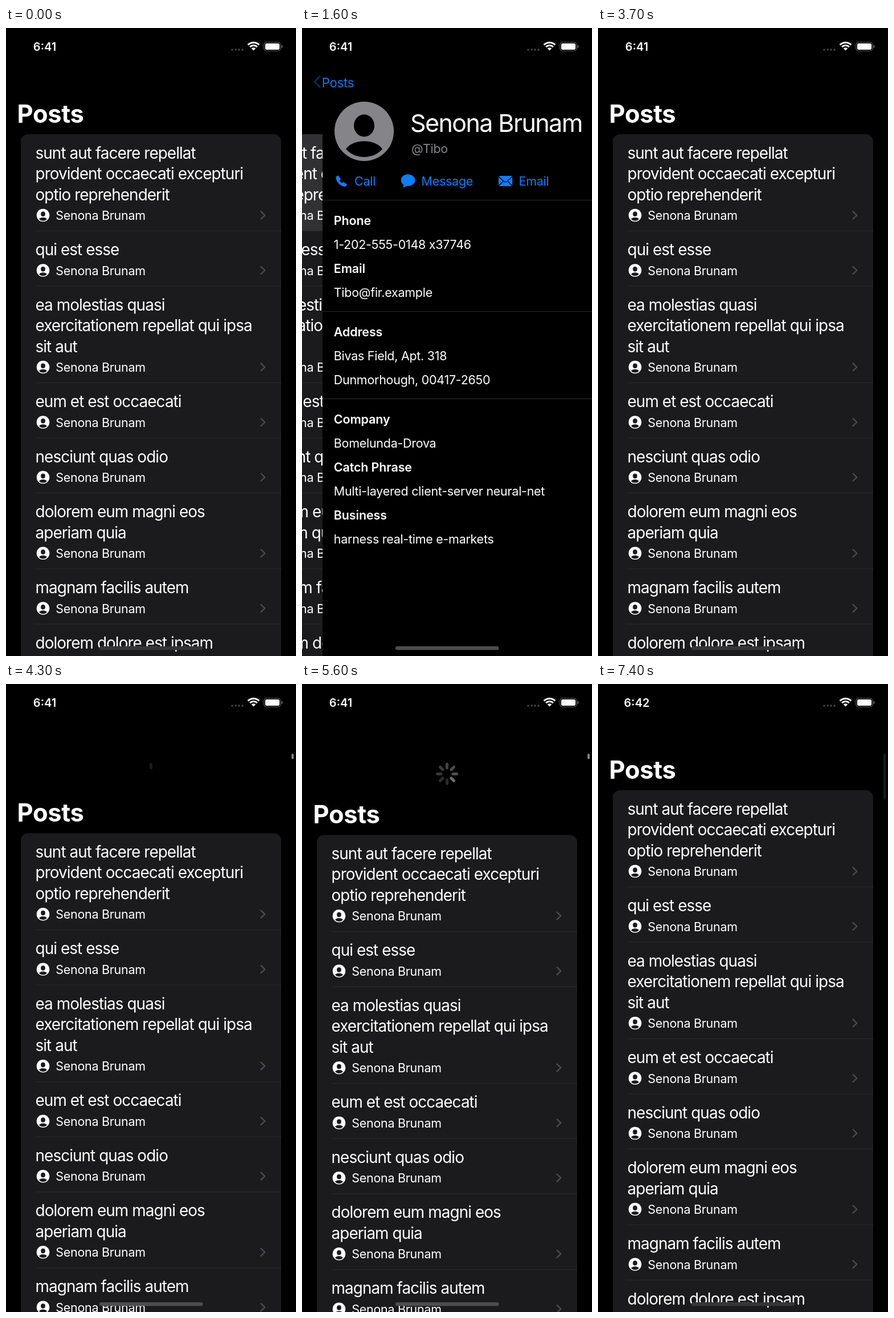
An HTML page that plays this animation: 509 px wide and 1100 px high, repeating every 7.5 s.

```html
<!DOCTYPE html>
<html lang="en">
<head>
<meta charset="utf-8">
<title>Posts</title>
<style>
  html, body { margin: 0; width: 100%; height: 100%; overflow: hidden; background: #000; }
  svg { display: block; width: 509px; height: 1100px; }
  text { font-family: Inter, sans-serif; font-optical-sizing: none; white-space: pre; fill: #fff; }
  .large { font-size: 43.5px; font-weight: 700; letter-spacing: -.4px; }
  .name { font-size: 43px; letter-spacing: -1.6px; }
  .post { font-size: 27.9px; letter-spacing: -.93px; }
  .body { font-size: 21.5px; letter-spacing: -.28px; }
  .head { font-size: 21.5px; font-weight: 600; letter-spacing: -.15px; }
  .clock { font-size: 20px; font-weight: 600; text-anchor: middle; }
  .blue { fill: #0a7fff; }
  .grey { fill: #85858a; }
</style>
</head>
<body>
<svg id="stage" viewBox="0 0 509 1100"></svg>
<script>
(() => {
const LOOP = 7500, STEP = 100, W = 509;
const PUSH = 1346, PRESS = 2600, POP = 2913;
const PULL = 4050, RELEASE = 4950, SPIN = 4700, FINISH = 5706;
const PERSON = 'Senona Brunam';
const stage = document.getElementById('stage');

function el(tag, attrs, parent = stage) {
  const node = document.createElementNS('http://www.w3.org/2000/svg', tag);
  set(node, attrs);
  return parent.appendChild(node);
}
function set(node, attrs) {
  for (const key in attrs) node.setAttribute(key, attrs[key]);
}
function text(parent, cls, x, y, value) {
  const node = el('text', { class: cls, x, y }, parent);
  node.textContent = value;
  return node;
}
function rect(parent, x, y, width, height, fill, rx = 0) {
  return el('rect', { x, y, width, height, fill, rx }, parent);
}
function line(parent, d, stroke, width) {
  return el('path', {
    d, stroke, fill: 'none', 'stroke-width': width,
    'stroke-linecap': 'round', 'stroke-linejoin': 'round'
  }, parent);
}
function avatar(parent, x, y, size, disc, ink) {
  const g = el('g', { transform: `translate(${x} ${y}) scale(${size / 52})` }, parent);
  el('circle', { r: 52, fill: disc }, g);
  el('ellipse', { cy: -10, rx: 18, ry: 19.5, fill: ink }, g);
  el('path', { d: 'M-32 31C-20 12.5 20 12.5 32 31C16 49.5 -16 49.5 -32 31Z', fill: ink }, g);
}

// Post list
const posts = [
  ['sunt aut facere repellat', 'provident occaecati excepturi', 'optio reprehenderit'],
  ['qui est esse'],
  ['ea molestias quasi', 'exercitationem repellat qui ipsa', 'sit aut'],
  ['eum et est occaecati'],
  ['nesciunt quas odio'],
  ['dolorem eum magni eos', 'aperiam quia'],
  ['magnam facilis autem'],
  ['dolorem dolore est ipsam']
];
const CARD = '#1b1b1d', LEAD = 36.5;
const list = el('g', {});
const clip = el('clipPath', { id: 'card' }, el('defs', {}));
rect(clip, 26, 186, 457, 1100, '#fff', 13);
const card = el('g', { 'clip-path': 'url(#card)' }, list);
rect(card, 26, 186, 457, 1100, CARD);
const glow = rect(card, 26, 186, 457, 169.5, '#313134');

let rowY = 186;
for (const lines of posts) {
  lines.forEach((s, i) => text(list, 'post', 51.5, rowY + 42.5 + i * LEAD, s));
  const mid = rowY + 32.5 + lines.length * LEAD;
  avatar(list, 65, mid, 11.3, '#fff', CARD);
  text(list, 'body', 87.2, mid + 8, PERSON);
  line(list, `M447.5 ${mid - 6.5}l6.8 6.5l-6.8 6.5`, '#4b4b4f', 2.4);
  rowY += 60 + lines.length * LEAD;
  rect(list, 52, rowY - .5, 431, 1, '#2a2a2c');
}

// Refresh spinner and scroll bar
const spinner = el('g', {});
const petals = Array.from({ length: 8 }, (_, i) => {
  const p = line(spinner, 'M0 -10.5V-17', '#fff', 5);
  p.setAttribute('transform', `rotate(${i * 45})`);
  return p;
});
const bar = rect(stage, 501, 122, 4, 80, '#fff', 2);

// Detail page
const page = el('g', {});
rect(page, 0, 0, W, 1100, '#000');
avatar(page, 73, 181, 52, '#858489', '#000');
text(page, 'name', 154, 182, PERSON);
text(page, 'body grey', 156, 218.5, '@Tibo');

el('path', {
  class: 'blue', transform: 'translate(23 258)',
  d: 'M5 1L8.5 6Q9 7 8 8L6.8 9.3Q8.5 12.2 11 13.6L12.4 12.4Q13.3 11.6 14.4 12.2' +
     'L19 15.3Q20 16 19.4 17.2Q17.5 20.4 14 19.6Q4 16.5 .6 6Q-.4 2.6 3 .8Q4.2 .2 5 1Z'
}, page);
el('ellipse', { class: 'blue', cx: 150, cy: 266.5, rx: 12.3, ry: 10.2 }, page);
el('path', { class: 'blue', d: 'M142 272Q143 277 140.5 279Q146 279 149 275Z' }, page);
rect(page, 309, 259, 24, 18, '#0a7fff', 3);
line(page, 'M309 260.5L319 269Q321 270.5 323 269L333 260.5M309.5 276L317 268.5M332.5 276L325 268.5', '#000', 1.5);
[[56, 'Call'], [173.5, 'Message'], [344.5, 'Email']]
  .forEach(([x, s]) => text(page, 'body blue', x, 276, s));

const sections = [
  [301.5, ['Phone', '1-202-555-0148 x37746', 'Email', 'Tibo@fir.example']],
  [496.5, ['Address', 'Bivas Field, Apt. 318', 'Dunmorhough, 00417-2650']],
  [649.5, ['Company', 'Bomelunda-Drova', 'Catch Phrase', 'Multi-layered client-server neural-net',
           'Business', 'harness real-time e-markets']]
];
const heads = ['Phone', 'Email', 'Address', 'Company', 'Catch Phrase', 'Business'];
for (const [y, rows] of sections) {
  rect(page, 0, y - .5, W, 1, '#2a2a2c');
  rows.forEach((s, i) =>
    text(page, heads.includes(s) ? 'head' : 'body', 19.7, y + 43 + i * 42.15, s));
}

// Navigation title, shared by both pages
const back = text(stage, 'body blue', 0, 0, 'Posts');
const title = text(stage, 'large', 0, 0, 'Posts');
const arrow = line(stage, 'M22.5 84.5L13.3 94L22.5 103.5', '#0a7fff', 2.8);

// Status bar
const clock = text(stage, 'clock', 68, 40, '6:41');
for (let i = 0; i < 4; i++) el('circle', { cx: 397 + i * 6, cy: 38, r: 2, fill: '#3a3a3c' });
function arc(r) {
  const k = r * Math.SQRT1_2;
  return `M${434.5 - k} ${39.5 - k}A${r} ${r} 0 0 1 ${434.5 + k} ${39.5 - k}`;
}
for (const r of [14, 9]) el('path', { d: arc(r), fill: 'none', stroke: '#fff', 'stroke-width': 3 });
el('path', { d: arc(5.3) + 'L434.5 39.5Z', fill: '#fff' });
set(rect(stage, 453, 25, 29, 15, 'none', 4.5), { stroke: '#6a6a6c', 'stroke-width': 1.2 });
rect(stage, 455, 27, 25, 11, '#fff', 2.8);
rect(stage, 483.5, 30, 1.8, 5, '#6a6a6c', .9);

const home = rect(stage, 164, 1083, 181.5, 6.6, '#4d4d4f', 3.3);

// Motion
const clamp = v => Math.min(1, Math.max(0, v));
const mix = (a, b, k) => a + (b - a) * k;

// Critically damped spring falling from 1 to 0
function spring(ms, rate) {
  const u = Math.max(0, ms) * rate / 1000;
  return (1 + u) * Math.exp(-u);
}
function pullAt(t) {
  if (t < RELEASE) {
    const s = clamp((t - PULL) / 750);
    return 290 * s * s * (3 - 2 * s);
  }
  if (t < FINISH) return mix(78, 290, spring(t - RELEASE, 14));
  return 78 * spring(t - FINISH, 14);
}

function drawNav(t, cover, pull) {
  const q = Math.pow(1 - cover, 1.3);
  const x = mix(35.3, 19.5, q), y = mix(102, 166, q) + pull;
  const place = s => `translate(${x} ${y}) scale(${s})`;
  const pressed = t >= PRESS && t < POP ? .3 : 1;
  set(title, { transform: place(mix(.5, 1, q)), opacity: Math.pow(q, 1.2) });
  set(back, { transform: place(mix(1, 2, q)), opacity: (1 - q) ** 2 * pressed });
  set(arrow, {
    transform: `translate(${125 * (1 - cover)} 0)`,
    opacity: clamp(1 - 9 * (1 - cover)) * pressed
  });
}

function drawSpinner(t, pull) {
  const active = t >= SPIN;
  const fade = t < FINISH ? 1 : clamp(1.5 * spring(t - FINISH, 14) - .5);
  const tilt = active ? 8 * clamp((5000 - t) / 200) : 0;
  const lead = 5 + Math.floor((t - 4800) / 125);
  set(spinner, {
    transform: `translate(254.5 157.5) rotate(${tilt}) scale(${mix(.5, 1, fade)})`,
    opacity: t < PULL ? 0 : fade
  });
  petals.forEach((p, i) => {
    const age = ((lead - i) % 8 + 8) % 8;
    const lit = age ? Math.max(.16, .34 - .025 * age) : .43;
    p.setAttribute('opacity', active ? lit : .3 * clamp((pull - 70) / 14 - i));
  });
}

function draw(t) {
  const cover = t < POP ? 1 - spring(t - PUSH, 17) : spring(t - POP, 17);
  const pull = pullAt(t);
  const x = W * (1 - cover);

  set(list, { transform: `translate(${-.3 * (W - x)} ${pull})` });
  set(page, { transform: `translate(${x} 0)` });
  set(glow, { opacity: t < 1000 ? 0 : t < POP ? 1 : cover });
  drawNav(t, cover, pull);
  drawSpinner(t, pull);
  set(bar, {
    height: Math.max(9.5, 80 - pull),
    opacity: t < 4100 ? 0 : .5 * clamp((7450 - t) / 250)
  });
  set(home, { fill: cover > .01 || pull > 20 ? '#4d4d4f' : '#353537' });
  clock.textContent = t < 5700 ? '6:41' : '6:42';
}

const start = performance.now();
function tick() {
  const t = (performance.now() - start) % LOOP;
  draw(Math.floor(t / STEP) * STEP);
  requestAnimationFrame(tick);
}
tick();
})();
</script>
</body>
</html>
```
